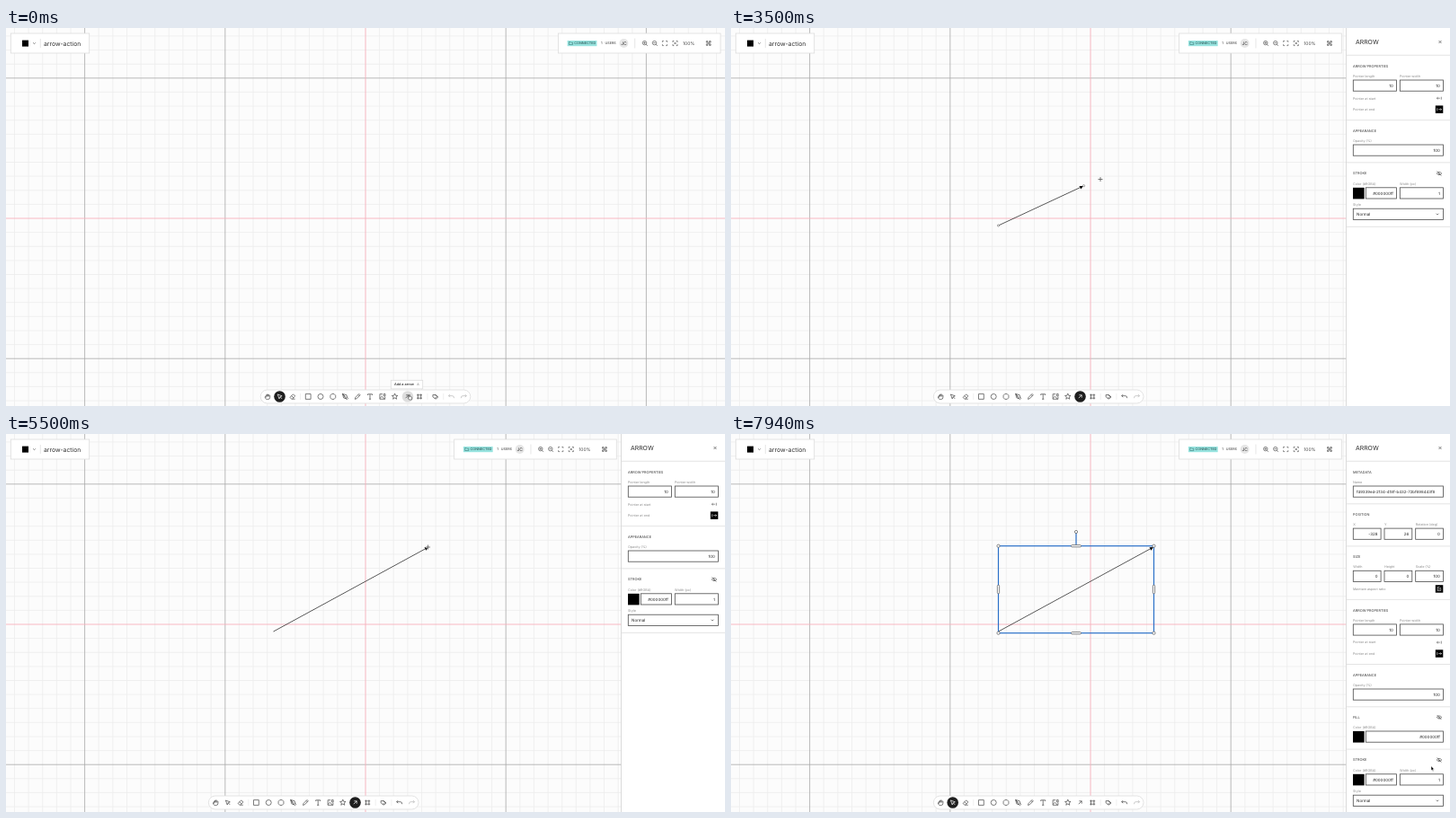
An HTML page for the animation above (8 s loop, 800 by 421 pixels).

```html
<!DOCTYPE html>
<html lang="en">
<head>
<meta charset="utf-8">
<title>arrow-action</title>
<style>
  html, body { margin: 0; width: 100%; height: 100%; overflow: hidden; background: #fcfcfc; }
  svg { display: block; width: 100%; height: 100%; }
  text { font-family: Inter, "Open Sans", sans-serif; text-rendering: geometricPrecision; }
</style>
</head>
<body>
<svg id="stage" viewBox="0 0 800 421"></svg>
<script>
const LOOP = 8000, STEP = 62.5;
const T = { pick: 310, down: 3185, finish: 5060, select: 6000 };
const START = [297.5, 220], END = [470, 126];
const INK = '#2b2b2b', EDGE = '#dcdcdc';

// Markup helpers
const rect = (x, y, w, h, fill = '#fff', stroke = 'none', sw = 0.8, r = 0) =>
  `<rect x="${x}" y="${y}" width="${w}" height="${h}" rx="${r}" fill="${fill}" stroke="${stroke}" stroke-width="${sw}"/>`;
const disc = (x, y, r, fill, stroke = 'none', sw = 0.8) =>
  `<circle cx="${x}" cy="${y}" r="${r}" fill="${fill}" stroke="${stroke}" stroke-width="${sw}"/>`;
const line = (d, stroke = INK, sw = 0.7, fill = 'none') =>
  `<path d="${d}" fill="${fill}" stroke="${stroke}" stroke-width="${sw}" stroke-linejoin="round"/>`;
const text = (s, x, y, size, fill = INK, anchor = 'start', weight = 400) =>
  `<text x="${x}" y="${y + size * 0.364}" font-size="${size}" fill="${fill}" text-anchor="${anchor}" font-weight="${weight}">${s}</text>`;
const group = (id, body, x = 0, y = 0) => `<g id="${id}" transform="translate(${x} ${y})">${body}</g>`;
const icon = (d, x, y, color = '#444', sw = 0.65) => `<g transform="translate(${x} ${y})">${line(d, color, sw)}</g>`;

const ring = r => `M${-r} 0a${r} ${r} 0 1 0 ${2 * r} 0a${r} ${r} 0 1 0 ${-2 * r} 0`;
const star = () => {
  let d = '';
  for (let i = 0; i < 10; i++) {
    const r = i % 2 ? 1.5 : 3.4, a = i * Math.PI / 5;
    d += `${i ? 'L' : 'M'}${(r * Math.sin(a)).toFixed(2)} ${(-r * Math.cos(a)).toFixed(2)}`;
  }
  return d + 'Z';
};
const ICONS = {
  hand: 'M-1.7 .8V-1.5q.6-.9 1.1 0V-2.4q.6-.9 1.1 0v.4q.6-.8 1.1 0v.8q.7-.7 1.1.2V.8q0 2.3-2.4 2.3h-.6q-1.5 0-2-1.2L-3 .4q.3-.9 1.3.4M-.6-1.5V0M.5-2V0M1.6-1.2V0',
  pointer: 'M-2.3-2.5L2.6-.7L.5.3L-.5 2.5ZM.5.3L2.5 2.4',
  eraser: 'M-2.8.8L.7-2.7L2.9-.5L-.3 2.7H-1.2ZM-1.2-.9L1.1 1.4M-.3 2.7H2.8',
  box: 'M-2.9-2.9H2.9V2.9H-2.9Z',
  oval: ring(3),
  hex: 'M-1.3-2.9H1.3L2.9-1.2V1.2L1.3 2.9H-1.3L-2.9 1.2V-1.2Z',
  pen: 'M-3-3L1.4-1.8L2 .8L.6 2.2L-2-1.5ZM.6 2.2L2 .8L3.1 1.9L1.7 3.2ZM-3-3L.1.1M-3-3L-1.9 1.4L.6 2.2',
  pencil: 'M-2.9 2.9L-2.4 1L1.6-3L2.9-1.7L-1.1 2.3ZM.6-2L1.9-.7',
  type: 'M-2.5-1.5V-2.7H2.5V-1.5M0-2.7V2.8M-1.1 2.8H1.1',
  image: 'M2.9 0V2.8H-2.9V-2.8H.2M-2.9 2L-.5-.2L2.3 2.8M1.4-2.9V-.6H3.2V-2.9ZM-1.5-1.4h.3',
  star: star(),
  arrow: 'M-1.7 1.7L1.7-1.7M-1.2-1.7H1.7V1.2',
  frame: 'M-1.7-3V3M1.7-3V3M-3-1.7H3M-3 1.7H3',
  tag: 'M-2.9-1.9H.5L3 .5L.7 2.5L-.9 1.2M-2.9-1.9V.3L-.4 2.4L1.9.1L-.5-1.9M-1.6-.6h.2',
  undo: 'M-1.5-2.4L-3-.8L-1.5.7M-3-.8H1.2Q3-.8 3 1.7',
  redo: 'M1.5-2.4L3-.8L1.5.7M3-.8H-1.2Q-3-.8-3 1.7',
  zoomIn: 'M-2.7-.4a2.2 2.2 0 1 0 4.4 0a2.2 2.2 0 1 0-4.4 0M1.1 1.2L2.8 2.8M-1.6-.4H.6M-.5-1.5V.7',
  zoomOut: 'M-2.7-.4a2.2 2.2 0 1 0 4.4 0a2.2 2.2 0 1 0-4.4 0M1.1 1.2L2.8 2.8M-1.6-.4H.6',
  corners: 'M-2.6-1.2V-2.6H-1.2M1.2-2.6H2.6V-1.2M2.6 1.2V2.6H1.2M-1.2 2.6H-2.6V1.2',
  fit: 'M-2.6-1.2V-2.6H-1.2M1.2-2.6H2.6V-1.2M2.6 1.2V2.6H1.2M-1.2 2.6H-2.6V1.2M-1.2-1.2L1.2 1.2M1.2-1.2L-1.2 1.2',
  nodes: 'M-2.4-2.4h1.5v1.5h-1.5ZM.9-2.4h1.5v1.5H.9ZM-2.4.9h1.5v1.5h-1.5ZM.9.9h1.5v1.5H.9ZM-.9-.9L.9.9M.9-.9L-.9.9',
  chevron: 'M-1.4-.7L0 .7L1.4-.7',
  close: 'M-1.5-1.5L1.5 1.5M1.5-1.5L-1.5 1.5',
  hidden: 'M-2.8 0Q0-3.2 2.8 0Q0 3.2-2.8 0M-2.4-2.5L2.4 2.5M-.8 0a.8.8 0 1 0 1.6 0',
  atStart: 'M-2.6 0H.8M-1.4-1.1L-2.6 0L-1.4 1.1M2.3-1.5V1.5',
  atEnd: 'M2.6 0H-.8M1.4-1.1L2.6 0L1.4 1.1M-2.3-1.5V1.5',
  check: 'M1.8-.2V1.9H-1.9V-1.9H.6M-.8-.3L.1.6L2.2-1.6'
};

function grid() {
  const unit = 15.62;
  let minor = '', major = '';
  for (let k = -26; k <= 26; k++) {
    if (!k) continue;
    const x = (400 + k * unit).toFixed(1), y = 212 + k * unit;
    const v = `M${x} 0V421`, h = y > 0 && y < 421 ? `M0 ${y.toFixed(1)}H800` : '';
    if (k % 10) minor += v + h; else major += v + h;
  }
  return rect(0, 0, 800, 421, '#fcfcfc') + line(minor, '#ececec', 0.8) +
    line(major, '#a9a9a9', 0.8) + line('M400 0V421M0 212H800', '#f7b0bb', 0.9);
}

function fileBar() {
  return rect(5.3, 6, 87.4, 22, '#fff', EDGE) + rect(18, 13.6, 7, 7, '#000') +
    icon(ICONS.chevron, 31.5, 17) + line('M38.3 12V22', EDGE, 0.7) + text('arrow-action', 42, 17.2, 6.8);
}

function statusBar() {
  const tools = [['zoomIn', 711], ['zoomOut', 722], ['corners', 733], ['fit', 744.5], ['nodes', 781.7]];
  return rect(614.4, 6, 180.6, 22, '#fff', EDGE) + rect(624.6, 14, 32.8, 6.2, '#97e3df') +
    icon('M-2-1.4H-.5L0-.8H2V1.5H-2Z', 628.5, 17, '#2b6665', 0.5) +
    text('CONNECTED', 632.3, 17.1, 3.8, '#1c4544') + text('1', 662, 17.1, 3.8) + text('USERS', 666.6, 17.1, 3.7) +
    disc(687.4, 17, 5, '#e6e6e6') + text('JC', 687.4, 17.1, 5, INK, 'middle') +
    line('M699.7 11.5V22.5', EDGE, 0.7) + tools.map(([n, x]) => icon(ICONS[n], x, 17)).join('') +
    text('100%', 753, 17.1, 5, '#444');
}

const TOOLS = { hand: 291, pointer: 304.5, eraser: 318.8, box: 336.2, oval: 350, hex: 363.8, pen: 377.5, pencil: 391.2,
  type: 405, image: 418.8, star: 432.6, arrow: 446.3, frame: 460, tag: 477.8, undo: 495.5, redo: 509.3 };

function toolbar() {
  let out = rect(283.2, 403, 233.6, 15, '#fff', EDGE, 0.8, 7.5) +
    line('M327.5 407V414M469 407V414M486.7 407V414', '#e6e6e6', 0.6) +
    `<circle id="hover" cx="447" cy="410.5" r="6.3" fill="#dedede"/>` +
    `<circle id="active" cy="410.5" r="6.3" fill="#1e1e1e"/>`;
  for (const n in TOOLS) out += group('t-' + n, line(ICONS[n], /do$/.test(n) ? '#b5b5b5' : '#444', 0.7), TOOLS[n], 410.5);
  return out;
}

// Panel pieces
const label = (s, x, y) => text(s, x, y, 3.7, '#8c8c8c');
const field = (x, y, w, value) => rect(x, y, w, 12.2, '#fff', '#4a4a4a') + text(value, x + w - 3.6, y + 6.3, 4.45, '#222', 'end');
const head = (s, y) => text(s, 692, y, 3.9, '#333');
const divider = y => line(`M685 ${y}H800`, '#dedede', 0.8);
const toggle = (s, y, name, on) => label(s, 692, y) +
  (on ? rect(783.8, y - 4.3, 8.5, 8.5, '#000') : '') + icon(ICONS[name], 788, y, on ? '#fff' : '#444', 0.6);
const swatch = y => rect(692, y, 12.6, 12.6, '#000');
const thirds = (y, items) => items.map(([n, v], i) => {
  const x = 692.3 + i * 34.7;
  return label(n, x, y + 11.5) + field(x, y + 15.8, 30.8, v);
}).join('');
const halves = (y, a, va, b, vb) => label(a, 692, y + 11.5) + label(b, 744, y + 11.5) +
  field(692.3, y + 15.8, 48.2, va) + field(744.3, y + 15.8, 48.2, vb);

const arrowProps = y => head('ARROW PROPERTIES', y) + halves(y, 'Pointer length', '10', 'Pointer width', '10') +
  toggle('Pointer at start', y + 36, 'atStart') + toggle('Pointer at end', y + 48.5, 'atEnd', true) + divider(y + 60.4);
const appearance = y => head('APPEARANCE', y) + label('Opacity (%)', 692, y + 11.5) +
  field(692.3, y + 15.8, 100.2, '100') + divider(y + 35.6);
const stroke = y => head('STROKE', y) + icon(ICONS.hidden, 788, y) +
  label('Color (#RGBA)', 692, y + 11.5) + label('Width (px)', 744, y + 11.5) + swatch(y + 15.8) +
  field(706.3, y + 15.8, 34.2, '#000000ff') + field(744.3, y + 15.8, 48.2, '1') +
  label('Style', 692, y + 35) + rect(692.3, y + 39.2, 100.2, 12.2, '#fff', '#4a4a4a') +
  text('Normal', 696, y + 45.4, 4.5, '#222') + icon(ICONS.chevron, 786, y + 45.4) + divider(y + 59.4);
const fill = y => head('FILL', y) + icon(ICONS.hidden, 788, y) + label('Color (#RGBA)', 692, y + 11) +
  swatch(y + 15.5) + field(706.3, y + 15.5, 86.2, '#000000ff') + divider(y + 35.6);
const metadata = y => head('METADATA', y) + label('Name', 692, y + 11.5) + field(692.3, y + 15.8, 100.2, '') +
  text('fd9339ed-2134-418f-b432-72bf698443f8', 696, y + 22.1, 4.35, '#222') + divider(y + 35.6);
const position = y => head('POSITION', y) + thirds(y, [['X', '-328'], ['Y', '26'], ['Rotation (deg)', '0']]) + divider(y + 35.6);
const size = y => head('SIZE', y) + thirds(y, [['Width', '0'], ['Height', '0'], ['Scale (%)', '100']]) +
  toggle('Maintain aspect ratio', y + 36, 'check', true) + divider(y + 47.9);

function panel() {
  return rect(684.6, -1, 117, 424, '#fff', '#d2d2d2') + text('ARROW', 695, 15.7, 6.9) +
    icon(ICONS.close, 789, 15.5) + divider(30.3) +
    group('draft', arrowProps(42.2) + appearance(114.2) + stroke(162)) +
    group('details', metadata(42.2) + position(89.3) + size(136.5) + arrowProps(196.1) +
      appearance(268.2) + fill(315.5) + stroke(363));
}

function selection() {
  const [l, t, r, b] = [297.5, 124.7, 470.5, 221.7], cx = 384, cy = 173, blue = '#2a70c8';
  const pill = (x, y, w, h) => rect(x - w / 2, y - h / 2, w, h, '#fff', '#555', 0.7, 1.1);
  return rect(l, t, r - l, b - t, 'none', blue, 1.2) + line(`M${cx} ${t}V109`, blue, 1.2) +
    [[l, t], [r, t], [l, b], [r, b], [cx, 109]].map(([x, y]) => disc(x, y, 1.6, '#fff', '#555', 0.7)).join('') +
    pill(cx, t, 11, 2.3) + pill(cx, b, 11, 2.3) + pill(l, cy, 2.3, 9.5) + pill(r, cy, 2.3, 9.5);
}

const tooltip = rect(428.3, 392.3, 35.4, 9.6, '#fff', EDGE) + text('Add a arrow', 432, 397, 3.8, '#222', 'start', 500) +
  text('A', 458.5, 397, 3.5, '#666', 'middle');
const cursors = group('cross', line('M-2.7 0H2.7M0-2.7V2.7', '#fff', 1.7) + line('M-2.5 0H2.5M0-2.5V2.5', '#555', 0.8)) +
  group('mouse', line('M0 0V5L1.1 4L1.9 5.8L2.8 5.4L2 3.7H3.5Z', '#fff', 0.5, '#000')) +
  group('finger', line('M-.6.2V-2.2q.6-.8 1.2 0V-.5L2.2 0q.7.2.6 1L2.3 3H-.5L-2 .8q.3-.9 1.4-.1', '#333', 0.6, '#fff'));

document.getElementById('stage').innerHTML = grid() +
  group('arrowLine', '<path id="shaft" stroke="#222" stroke-width=".75"/><path id="tip" fill="#000"/>') +
  group('ends', disc(...START, 1.1, '#fff', '#666', 0.6) + '<circle id="endDot" r="1.1" fill="#fff" stroke="#666" stroke-width=".6"/>') +
  group('sel', selection()) + fileBar() + group('status', statusBar()) + group('tools', toolbar()) +
  group('tooltip', tooltip) + group('panel', panel()) + cursors;

const el = id => document.getElementById(id);
const show = (id, on) => el(id).setAttribute('display', on ? 'inline' : 'none');
const move = (id, x, y) => el(id).setAttribute('transform', `translate(${x} ${y})`);
const tint = (name, color) => el('t-' + name).firstChild.setAttribute('stroke', color);

// Cursor route: time, x, y
const ROUTE = [[310, 449, 411], [440, 434, 392], [690, 345, 280], [875, 300, 229], [1000, 294.5, 222], [1875, 296, 222],
  [2000, 297.5, 221.5], [2750, 297.5, 220.5], [2875, 297.5, 220], [3125, 297.5, 220], [3250, 327, 207], [3437.5, 392, 176],
  [3500, 411, 168.5], [3687.5, 450, 143], [3937.5, 463, 132], [4187.5, 466.5, 129], [4250, 467, 128.8], [4687.5, 469.5, 126],
  [5980, 469.5, 126], [6125, 485, 141], [6375, 571, 225], [6562.5, 594, 246], [6750, 595.5, 247.3],
  [7420, 595.5, 247.3], [7562.5, 640, 278], [7750, 745, 347], [7937.5, 779, 369.8]];

function cursorAt(t) {
  const i = ROUTE.findIndex(p => p[0] > t);
  if (i === 0) return ROUTE[0].slice(1);
  if (i < 0) return ROUTE[ROUTE.length - 1].slice(1);
  const a = ROUTE[i - 1], b = ROUTE[i], k = (t - a[0]) / (b[0] - a[0]);
  return [a[1] + (b[1] - a[1]) * k, a[2] + (b[2] - a[2]) * k];
}

function drawArrow(x, y) {
  const dx = x - START[0], dy = y - START[1], len = Math.hypot(dx, dy) || 1, ux = dx / len, uy = dy / len;
  const bx = x - ux * 4, by = y - uy * 4;
  el('shaft').setAttribute('d', `M${START}L${bx} ${by}`);
  el('tip').setAttribute('d', `M${x} ${y}L${bx - uy * 2} ${by + ux * 2}L${bx + uy * 2} ${by - ux * 2}Z`);
}

function update(time) {
  const t = Math.floor((time + 3) / STEP) * STEP;
  const open = t >= T.pick, drawn = t >= T.down, done = t >= T.finish, chosen = t >= T.select;
  const arrowTool = open && !chosen, [x, y] = cursorAt(t);

  move('status', open ? -115.75 : 0, 0);
  move('tools', open ? -57.8 : 0, 0);
  for (const id of ['tooltip', 'hover']) show(id, !open);
  show('panel', open);
  show('draft', !chosen);
  show('details', chosen);

  el('active').setAttribute('cx', arrowTool ? TOOLS.arrow : TOOLS.pointer);
  tint('arrow', arrowTool ? '#fff' : '#444');
  tint('pointer', arrowTool ? '#444' : '#fff');
  tint('undo', drawn ? '#444' : '#b5b5b5');

  show('arrowLine', drawn);
  show('ends', drawn && !done);
  show('sel', chosen);
  const end = done ? END : cursorAt(t - STEP);
  drawArrow(...end);
  el('endDot').setAttribute('cx', end[0] + 0.5);
  el('endDot').setAttribute('cy', end[1] - 0.3);

  const shape = chosen ? 'mouse' : y > 403 ? 'finger' : 'cross';
  for (const id of ['cross', 'mouse', 'finger']) show(id, id === shape);
  move(shape, x, y);
}

function tick() {
  update(performance.now() % LOOP);
  requestAnimationFrame(tick);
}
tick();
</script>
</body>
</html>
```
